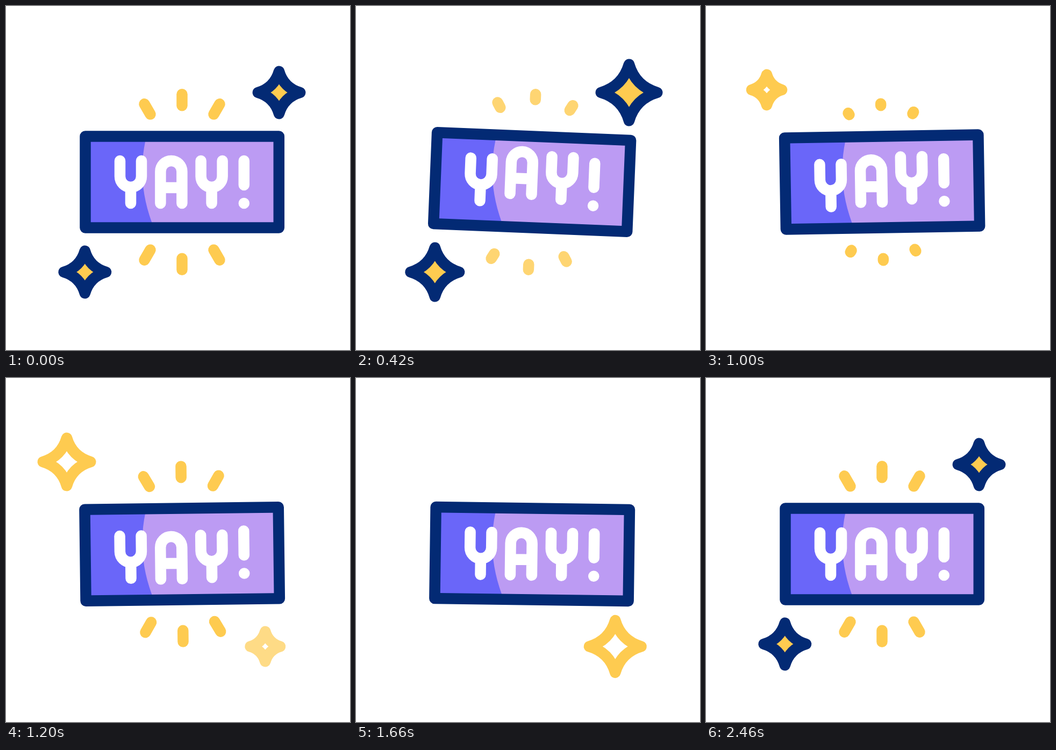
Animation, 640 px wide and 640 px high, one loop 2500 ms. Source, as an HTML page with a canvas:

```html
<!DOCTYPE html>
<html lang="en">
<head>
<meta charset="utf-8">
<title>Yay</title>
<style>
  html, body { margin: 0; width: 100%; height: 100%; overflow: hidden; background: #fff; }
  canvas { display: block; width: 640px; height: 640px; }
</style>
</head>
<body>
<canvas id="stage" width="640" height="640"></canvas>
<script>
const ctx = document.getElementById('stage').getContext('2d');
const LOOP = 2500, STEP = 20, LINE = 20.5, CENTER = 327.5;
const NAVY = [3, 42, 116], YELLOW = [254, 203, 80], WHITE = [255, 255, 255];
const VIOLET = '#6a66f9', LILAC = '#bc9bf3';

// Eased progress from 0 to 1.
function ease(t, start, length) {
  const p = Math.min(Math.max((t - start) / length, 0), 1);
  return (1 - Math.cos(Math.PI * p)) / 2;
}

// Moves through the poses; each beat lasts longer than the one before by a fixed amount.
function swing(t, poses, beat, stretch = 0) {
  const timeOf = k => k * (beat + stretch * k);
  let value = poses[0];
  for (let k = 1; k < poses.length; k++) {
    value += (poses[k] - poses[k - 1]) * ease(t, timeOf(k - 1), timeOf(k) - timeOf(k - 1));
  }
  return value;
}

// Time since birth, wrapped around the loop.
const age = (t, born) => (t - born + LOOP) % LOOP;

// Colour faded towards the white stage.
const fade = (rgb, alpha) => `rgb(${rgb.map(c => Math.round(255 + (c - 255) * alpha))})`;

function polyline(...points) {
  points.forEach(([x, y], i) => i ? ctx.lineTo(x, y) : ctx.moveTo(x, y));
}

// A star fades in, may settle at a resting size, swells to its peak, then shrinks away.
const MIN_SIZE = 38, MAX_SIZE = 64.8;
const navyStar = { line: NAVY, fill: YELLOW, settle: 11.5 };
const yellowStar = { line: YELLOW, fill: WHITE, settle: 0, swell: 25, peak: 425 };
const stars = [
  { ...navyStar, x: 508, y: 161, born: 1920, swell: 700, peak: 965 },
  { ...navyStar, x: 146.8, y: 495, born: 2000, swell: 620, peak: 845 },
  { ...yellowStar, x: 113, y: 156, born: 945 },
  { ...yellowStar, x: 482.3, y: 499.5, born: 1175 }
];

function drawStar({ x, y, line, fill, settle, born, swell, peak }, t) {
  const u = age(t, born);
  const alpha = ease(u, 0, 40) * (1 - ease(u, peak + 170, 60));
  if (alpha <= 0) return;
  const range = MAX_SIZE - MIN_SIZE;
  const size = MIN_SIZE + settle * ease(u, 30, 380)
    + (range - settle) * ease(u, swell, peak - swell) - range * ease(u, peak, 188);
  const r = size - LINE / 2, c = r * 0.225;
  ctx.save();
  ctx.translate(x, y);
  ctx.beginPath();
  ctx.moveTo(0, -r);
  ctx.quadraticCurveTo(c, -c, r, 0);
  ctx.quadraticCurveTo(c, c, 0, r);
  ctx.quadraticCurveTo(-c, c, -r, 0);
  ctx.quadraticCurveTo(-c, -c, 0, -r);
  ctx.closePath();
  ctx.fillStyle = fade(fill, alpha);
  ctx.strokeStyle = fade(line, alpha);
  ctx.fill();
  ctx.stroke();
  ctx.restore();
}

// Rays grow outwards, then shorten towards their outer ends.
const bursts = [{ born: 1823, trim: 891 }, { born: 920, trim: 344 }];

function drawRays({ born, trim }, t) {
  const u = age(t, born);
  const from = ease(u, trim, 400), to = ease(u, 0, 300);
  const alpha = ease(u, 0, 40) * (1 - ease(u, trim + 148, 200));
  if (alpha <= 0) return;
  ctx.strokeStyle = fade(YELLOW, alpha);
  for (const side of [-1, 1]) {
    for (const lean of [-1, 0, 1]) {
      const [x, y, dx, dy] = lean ? [59, 126.2, 11, 19] : [0, 142.3, 0, 21];
      const at = k => [CENTER + lean * (x + dx * k), CENTER + side * (y + dy * k)];
      ctx.beginPath();
      polyline(at(from), at(to));
      ctx.stroke();
    }
  }
}

function tilt(t) {
  const angle = 2.95 * ease(t, 120, 430) + swing(t - 720, [0, -4.45, -0.95, -2.95], 365);
  ctx.translate(CENTER, CENTER);
  ctx.rotate(angle * Math.PI / 180);
  ctx.translate(-CENTER, -CENTER);
}

function drawPanel(t) {
  const panel = [147.5, 242.5, 360.3, 170];
  ctx.save();
  tilt(t);
  ctx.fillStyle = LILAC;
  ctx.fillRect(...panel);
  ctx.restore();

  // The shade's curved edge stays still while the panel tilts.
  ctx.save();
  ctx.beginPath();
  polyline([0, 426], [0, 226], [265.7, 226]);
  ctx.quadraticCurveTo(235.3, 326, 280.9, 426);
  ctx.clip();
  tilt(t);
  ctx.fillStyle = VIOLET;
  ctx.fillRect(...panel);
  ctx.restore();

  ctx.save();
  tilt(t);
  ctx.strokeStyle = fade(NAVY, 1);
  ctx.strokeRect(...panel);
  ctx.restore();
}

function letterY(x) {
  ctx.moveTo(x - 20, 288);
  ctx.arc(x, 317, 20, Math.PI, 0, true);
  ctx.lineTo(x + 20, 288);
  polyline([x, 337], [x, 367]);
}

function letterA(x) {
  ctx.moveTo(x - 20, 367);
  ctx.arc(x, 308, 20, Math.PI, 0);
  ctx.lineTo(x + 20, 367);
  polyline([x - 20, 338], [x + 20, 338]);
}

function exclamation(x) {
  polyline([x, 288], [x, 333]);
  polyline([x, 367], [x, 367.01]);
}

const letters = [[letterY, 232], [letterA, 307.4], [letterY, 382.6], [exclamation, 442.8]];

function drawLetters(t) {
  ctx.strokeStyle = '#fff';
  letters.forEach(([shape, x], i) => {
    ctx.save();
    ctx.translate(0, swing(t - 120 - i * 100, [0, -16.5, 14, -7, 7, 0], 170, 17));
    ctx.beginPath();
    shape(x);
    ctx.stroke();
    ctx.restore();
  });
}

function draw(t) {
  ctx.fillStyle = '#fff';
  ctx.fillRect(0, 0, 640, 640);
  ctx.lineWidth = LINE;
  ctx.lineCap = ctx.lineJoin = 'round';
  stars.forEach(star => drawStar(star, t));
  drawPanel(t);
  ctx.save();
  tilt(t);
  bursts.forEach(burst => drawRays(burst, t));
  drawLetters(t);
  ctx.restore();
}

let start;
function tick(now) {
  start ??= now;
  draw(Math.floor(((now - start) % LOOP) / STEP) * STEP);
  requestAnimationFrame(tick);
}
draw(0);
requestAnimationFrame(tick);
</script>
</body>
</html>
```
